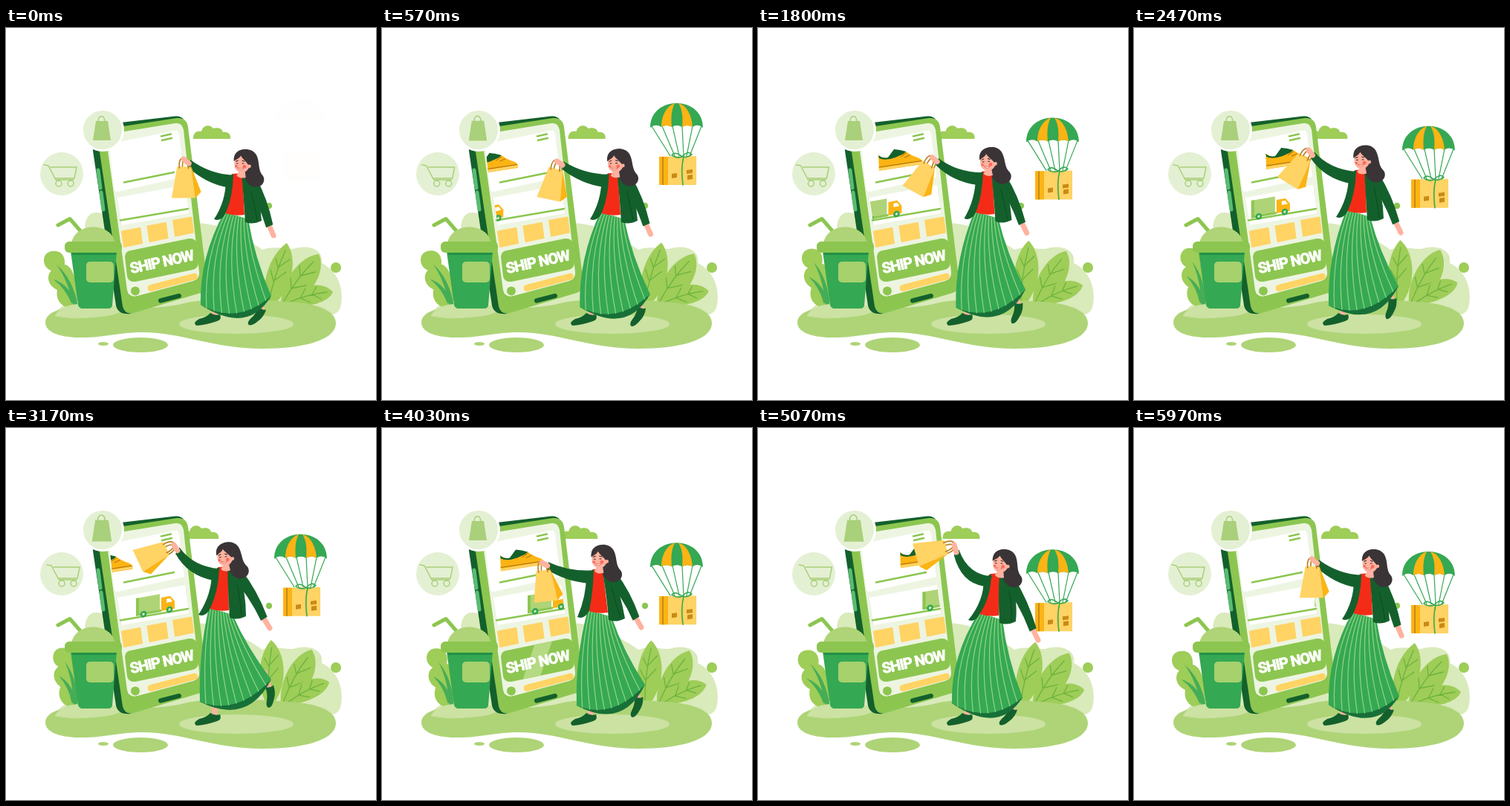
Recreate the animation shown at these times as an HTML page. Size 498 by 500 pixels, loop 6010 ms.

```html
<!DOCTYPE html>
<html lang="en">
<head>
<meta charset="utf-8">
<title>Ship now</title>
<style>
  html, body { margin: 0; width: 100%; height: 100%; overflow: hidden; background: #fff; }
  svg { display: block; width: 498px; height: 500px; }
  .lime { fill: #8cc650; } .sage { fill: #aed477; } .leaf { fill: #9ecd58; } .pale { fill: #d9eabb; }
  .dark { fill: #14602c; } .green { fill: #35a853; } .gold { fill: #ffd364; } .amber { fill: #fbb414; }
  .skin { fill: #ffb29f; } .hair { fill: #3a3437; } .white { fill: #fff; } .glow { fill: #cbe2a2; }
  .line { fill: none; stroke-linecap: round; stroke-linejoin: round; }
  .vein { stroke: #6cb33f; stroke-width: 1.3; }
  .icon { stroke: #a9d07a; stroke-width: 1.5; }
  .limb { fill: none; stroke: #ffb29f; stroke-width: 7; stroke-linecap: round; }
  text { font: 700 20px Roboto, "Open Sans", sans-serif; fill: #fff; stroke: #fff; stroke-width: .8; stroke-linejoin: round; }
</style>
</head>
<body>
<svg viewBox="0 0 498 500">
  <defs>
    <clipPath id="panelA"><path d="M139 156L226 138Q232 137 233 143L240 200L150 220Q146 221 145 215Z"/></clipPath>
    <clipPath id="panelB"><path d="M150 228L241 211L246 249L156 265Z"/></clipPath>
    <clipPath id="button"><path d="M168 299L246 283Q256 282 257 291L259 315Q259 323 251 325L174 341Q165 342 163 334L160 308Q160 300 168 299Z"/></clipPath>
  </defs>

  <path class="pale" d="M66 388C70 372 90 364 100 372L108 290C103 262 108 248 122 248C135 248 139 262 150 270L250 264C275 256 320 280 345 298C362 292 376 298 386 297C408 290 428 298 425 316C446 326 455 350 451 372C448 390 430 386 400 392L100 395Z"/>
  <circle class="leaf" cx="444" cy="322" r="7"/>
  <circle class="lime" cx="354" cy="239" r="4.2"/>

  <!-- plants -->
  <g id="leafA">
    <path class="leaf" d="M350 372C342 338 358 302 378 289C393 310 386 350 360 372Z"/>
    <path class="line vein" d="M354 368Q360 335 376 299M360 340L356 325M360 340L377 328M366 322L363 310M366 322L382 311"/>
  </g>
  <g id="leafB">
    <path class="leaf" d="M370 372C370 340 396 306 421 304C432 328 410 360 384 372Z"/>
    <path class="line vein" d="M373 369Q392 335 414 314M384 350L383 336M384 350L404 346M396 333L395 320M396 333L416 328"/>
  </g>
  <g id="leafC">
    <path class="leaf" d="M374 372C385 346 425 337 440 355C432 372 400 376 374 372Z"/>
    <path class="line vein" d="M380 369Q405 358 432 355M396 363L403 350M396 363L410 369M412 358L418 348M412 358L424 364"/>
  </g>
  <g id="bush">
    <path class="leaf" d="M96 376C78 379 66 368 69 352C56 346 54 333 61 326C48 322 47 302 62 300C75 298 80 308 79 318C90 320 97 340 96 376Z"/>
    <path fill="#45ad57" d="M91 374Q84 340 68 318Q90 337 97 374ZM88 370Q80 350 64 338Q84 344 95 370Z"/>
  </g>

  <path class="sage" d="M53 396C53 380 80 373 115 374C160 375 200 380 240 370C275 362 330 364 380 368C420 370 445 380 444 398C442 420 400 431 345 431C280 431 235 409 185 409C150 409 130 417 95 416C70 415 53 408 53 396Z"/>
  <path class="glow" d="M66 387C72 374 90 370 110 371L160 374Q158 386 120 389Q85 392 66 387Z"/>
  <ellipse class="glow" cx="310" cy="398" rx="77" ry="13"/>
  <ellipse class="sage" cx="181" cy="426" rx="37" ry="10"/>
  <ellipse class="sage" cx="131" cy="424.500" rx="7" ry="2.500"/>

  <path id="cloud" class="leaf" d="M0 149C0 140 5 138 11 139C13 130 23 129 27 135C33 133 39 135 40 140C47 139 51 143 50 149Z"/>

  <!-- phone -->
  <path class="dark" d="M117 165Q115 133 138 129L228 118.500Q236 118 239 123L236 135L150 145L168 384Q151 386 148 373Z"/>
  <path class="line" stroke="#58bd70" stroke-width="5" stroke-linecap="butt" d="M124 191L127 215M128 221L131 244"/>
  <path class="lime" d="M125 160Q122 139 139 135L230 121Q243 120 245 133L271 342Q272 353 262 356L172 383Q160 386 157 374Z"/>
  <path fill="#edf5e2" d="M137 165L138 150Q150 141 160 139L228 128Q237 127 239 137L260 328Q261 337 252 340L177 360Q165 363 163 352Z"/>
  <path class="white" d="M139 156L226 138Q232 137 233 143L240 200L150 220Q146 221 145 215ZM150 228L241 211L246 249L156 265Z"/>
  <path class="line" stroke="#8cc650" stroke-width="2.500" d="M159 207.500L226 194M154 258.500L245 243M209 145.500L222 142.500M210 151L223 148"/>
  <g clip-path="url(#panelA)"><g id="shoe">
    <path class="amber" d="M0 0L-1 -21Q5 -16 12 -18L20 -28L36 -26Q44 -20 54 -17Q60 -14 58 -9Z"/>
    <path class="dark" d="M-1 -21Q5 -16 12 -18L20 -29L28 -28L36 -26L33 -23L22 -18Q8 -13 0 -17Z"/>
    <path class="line" stroke="#ffd364" stroke-width="3" d="M1 -2L57 -11"/>
    <path class="line" stroke="#a96e12" stroke-width="1" d="M0 -5L57 -13.500M29 -19L36 -24M34 -18L41 -21"/>
  </g></g>
  <g clip-path="url(#panelB)"><g id="truck">
    <path class="sage" d="M0 0H32V23H0Z"/>
    <path class="lime" d="M0 0H4V23H0ZM0 21H34V24H0Z"/>
    <path class="amber" d="M34 5H46L52 13V23H34Z"/>
    <path class="white" d="M41 8H46L49 13H41Z"/>
    <g class="green"><circle cx="10" cy="23" r="4.300"/><circle cx="45" cy="23" r="4.300"/></g>
    <g class="pale"><circle cx="10" cy="23" r="1.700"/><circle cx="45" cy="23" r="1.700"/></g>
  </g></g>
  <path id="tile" class="gold" stroke="#ffd364" stroke-width="2" stroke-linejoin="round" d="M156 273.500L180.500 269L183 289L159 294Z"/>
  <use href="#tile" x="34.500" y="-7"/><use href="#tile" x="69" y="-14.500"/>
  <g clip-path="url(#button)">
    <path class="lime" d="M150 270H270V350H150Z"/>
    <path id="shine" fill="#b5da83" d="M4 280H26L4 345H-18Z"/>
  </g>
  <text transform="translate(168.500 330) rotate(-12)" letter-spacing="-1.100">SHIP NOW</text>
  <circle class="lime" cx="174" cy="353.500" r="6"/>
  <path class="line" stroke="#ffd364" stroke-width="9" d="M195 349.500L253.500 334"/>
  <path class="line" stroke="#14602c" stroke-width="6" d="M208 366.500L233 360"/>

  <!-- floating icons -->
  <circle cx="130" cy="137" r="27.500" fill="#e4f0d3" stroke="#fff" stroke-width="3"/>
  <g id="bagIcon">
    <path fill="#a9d07a" d="M-8 -11H8L12 15H-12Z"/><path class="line icon" d="M-5 -9C-6 -20 5 -20 4 -9"/>
  </g>
  <circle cx="75" cy="196" r="29" fill="#e4f0d3"/>
  <path id="cart" class="line icon" d="M51 184L57 185L67 204H91M60 187H95L92 202H66M67 209a4 4 0 1 0 8 0a4 4 0 1 0 -8 0M83 209a4 4 0 1 0 8 0a4 4 0 1 0 -8 0"/>

  <!-- cup -->
  <path class="line" stroke="#8cc650" stroke-width="5" stroke-linecap="butt" d="M70 265L86 256.500L103 276"/>
  <path class="sage" d="M88 290C92 260 143 260 147 290Z"/>
  <path class="green" d="M87 300H149L143 373Q142 377 138 377H103Q98 377 97 372Z"/>
  <path fill="#238f47" d="M88 301H149L148.500 305H88.500Z"/>
  <rect class="lime" x="79" y="287" width="77" height="15" rx="6"/>
  <rect x="108" y="314" width="37" height="28" rx="5" fill="#a6d16d"/>

  <!-- parachute, canopy top at 0 -->
  <g id="chute">
    <path class="line" stroke="#35a853" stroke-width="1.200" d="M363 31L388 71M377 31L394 71M391 31L400 71M404 31L406 71M418 31L410 71M430 31L414 71"/>
    <path class="green" d="M361 33C361 -11 432 -11 432 33Q425 27 418 32Q411 28 404 32Q397 28 390 32Q383 28 376 32Q368 27 361 33Z"/>
    <path class="amber" d="M376 32C376 19 381 5 394 0C389 10 389 21 390 32Q383 28 376 32ZM404 32C405 21 405 10 399 0C412 4 417 19 418 32Q411 28 404 32Z"/>
    <path class="gold" d="M373 72L423 71V110H373Z"/>
    <path class="amber" d="M373 72H385V110H373Z"/>
    <path fill="#c98a16" d="M377 72H379V110H377ZM390 95L397 94V100L390 101ZM410 90L418 89V94L410 95ZM411 97L418 96V102L411 103Z"/>
    <path class="line" stroke="#35a853" stroke-width="1.600" d="M406 72Q402 88 405 110M404 72Q394 64 390 70Q396 75 404 72Q412 63 417 69Q411 74 404 72"/>
  </g>

  <!-- woman -->
  <path id="legs" class="limb"/>
  <path class="dark" d="M275 383Q281 387 288 385Q291 392 284 394Q270 399 257 400Q250 397 260 391Q270 389 275 383Z"/>
  <path id="foot" class="dark" d="M-5 0Q1 2 6 -2Q9 8 6 16Q3 28 -2 28Q-6 26 -4 18Q-2 10 -5 0Z"/>
  <path id="lining" fill="#177038"/>
  <path id="skirt" class="green"/>
  <path id="pleats" class="line" stroke="#93d483" stroke-width="1.200"/>
  <path id="shirt" fill="#f42c17"/>
  <path id="jacket" class="dark"/>
  <path id="seam" class="line" stroke="#0b4a20" stroke-width="1"/>
  <path id="handB" class="limb"/>
  <path id="armB" class="dark"/>
  <path id="armA" class="dark"/>
  <g id="bag">
    <path class="gold" d="M-9 11L10 12L14 54L-18 53Z"/>
    <path class="amber" d="M10 12L22 46L14 54Z"/>
    <path class="line" stroke="#b9801f" stroke-width="1.600" d="M-6 13C-8 -5 6 -5 6 14M-2 11C-2 -4 9 -2 9 12"/>
  </g>
  <path id="handA" class="limb"/>
  <g id="head">
    <path class="hair" d="M-11 -8C-12 -20 12 -26 20 -12C25 -2 22 8 28 16C34 22 30 32 22 33C14 35 7 30 3 20L-2 -8Z"/>
    <path class="skin" d="M-11 -4C-10 -14 10 -14 11 -2C12 4 8 10 4 12L5 20Q-4 22 -8 17L-5 12C-10 10 -12 4 -11 -4Z"/>
    <path class="hair" d="M-12 -3C-13 -16 -2 -22 8 -19C16 -17 21 -8 20 6C16 12 12 10 10 5C8 -1 1 -5 -2 -11C-4 -7 -8 -6 -12 -3Z"/>
    <circle class="skin" cx="10" cy="4" r="2.500"/>
    <g fill="#f9695b"><circle cx="3" cy="4.500" r="2.500"/><circle cx="-8.500" cy="4" r="1.800"/></g>
    <path class="white" stroke="#d83b30" stroke-width=".6" d="M-7 6Q-3 8 2 7Q-2 12 -7 6Z"/>
    <path class="line" stroke="#3a3437" stroke-width="1.200" d="M-8 0L-6 0M0 0L2 0M-9 -3L-6 -4M0 -4L3 -3"/>
  </g>
</svg>
<script>
const PERIOD = 6010;
const KEYS = [0, 1130, 2470, 3170, 4030, 5070];

// One row per key time: x, y and, where needed, an angle
const pose = {
  head: [[318, 182, 0], [312, 181, -5], [307, 177, -4], [295, 173, -7], [293, 176, -2], [327, 182, 2]],
  neck: [[310, 198], [309, 196], [303, 193], [291, 189], [289, 192], [318, 198]],
  waist: [[306, 250], [306, 250], [298, 247], [285, 244], [289, 247], [309, 251]],
  elbow: [[272, 203], [268, 203], [260, 196], [248, 192], [250, 200], [278, 203]],
  hold: [[239, 176], [234, 180], [235, 164], [226, 157], [215, 181], [264, 157]],
  free: [[360, 279], [363, 276], [359, 275], [355, 269], [349, 268], [377, 285]],
  bag: [[-2], [24], [30], [63], [-8], [72]],
  hemL: [[262, 372], [270, 377], [262, 373], [261, 368], [262, 373], [261, 370]],
  hemR: [[357, 360], [364, 355], [356, 347], [357, 338], [354, 345], [356, 362]],
  foot: [[344, 377, 35], [353, 374, 14], [347, 364, 10], [354, 348, -3], [345, 362, 14], [343, 377, 35]]
};
// The shoe crosses its panel twice: quick in, slow drift, quick out
const shoePath = [[0, 75], [270, 112], [1130, 148], [2470, 178], [2800, 250], [2801, 75],
  [3170, 112], [4030, 160], [5070, 192], [5500, 250], [PERIOD, 250]];

const $ = id => document.getElementById(id);
const draw = (id, d) => $(id).setAttribute('d', d);
const place = (id, value) => $(id).setAttribute('transform', value);
const lerp = (a, b, u) => a.map((v, i) => v + (b[i] - v) * u);
const off = (p, x, y) => [p[0] + x, p[1] + y];
const quad = (a, c, b) => `M${a}Q${c} ${b}`;

// Curved sleeve, from half width wa at a to wb at b
function sleeve(a, c, b, wa, wb) {
  const dx = b[0] - a[0], dy = b[1] - a[1], len = Math.hypot(dx, dy);
  const side = (p, w) => off(p, -dy / len * w, dx / len * w);
  const wc = (wa + wb) / 2;
  return `${quad(side(a, wa), side(c, wc), side(b, wb))}L${side(b, -wb)}Q${side(c, -wc)} ${side(a, -wa)}Z`;
}

// Smooth periodic curve through the rows that rests at turning points
function sample(rows, t) {
  const n = KEYS.length;
  const time = j => KEYS[(j + n) % n] + PERIOD * Math.floor(j / n);
  const row = j => rows[(j + n) % n];
  const i = KEYS.findLastIndex(k => k <= t);
  const span = time(i + 1) - time(i), u = (t - time(i)) / span;
  return row(i).map((a, k) => {
    const b = row(i + 1)[k];
    const rate = j => (row(j + 1)[k] - row(j)[k]) / (time(j + 1) - time(j));
    const slope = j => {
      const p = rate(j - 1), q = rate(j);
      return p * q > 0 ? 2 * p * q / (p + q) * span : 0;
    };
    const m = slope(i), q = slope(i + 1);
    return a + u * (m + u * (3 * (b - a) - 2 * m - q + u * (2 * (a - b) + m + q)));
  });
}

function linear(points, t) {
  const i = Math.max(1, points.findIndex(p => p[0] > t));
  const [a, x] = points[i - 1], [b, y] = points[i];
  return x + (y - x) * (t - a) / (b - a);
}

function scenery(t) {
  const angle = 2 * Math.PI * t / PERIOD;
  const wave = Math.cos(angle), sway = (1 - wave) / 2;
  place('cloud', `translate(${244 + 8 * wave})`);
  place('leafA', `rotate(${-15 * sway} 352 368)`);
  place('leafB', `rotate(${-8 * sway} 372 370)`);
  place('leafC', `rotate(${-13 * sway} 378 370)`);
  place('bush', `rotate(${11.5 * sway} 92 372)`);

  // icons beat three times per loop
  const beat = -Math.cos(3 * angle);
  place('cart', `translate(${2.2 + 2.2 * beat})`);
  place('bagIcon', `translate(129 136) scale(${1 + .12 * Math.max(0, beat)})`);

  const x = linear(shoePath, t);
  place('shoe', `translate(${x} ${194 - .13 * (x - 148)})`);
  const tx = 97.3 + .0245 * t;
  place('truck', `translate(${tx} ${232 - .18 * (tx - 158)}) skewY(-10)`);
  place('shine', `translate(${205 + (t - 4030) * .18})`);

  const fall = Math.sin(angle / 4) ** 1.3;
  place('chute', `translate(0 ${95 + 71 * fall})`);
  $('chute').style.opacity = Math.min(1, t / 300);
}

function woman(t) {
  const p = {};
  for (const key in pose) p[key] = sample(pose[key], t);
  const { neck: n, waist: w, hold, free, hemL, hemR, foot } = p;

  const ankle = foot.slice(0, 2);
  draw('legs', `M281 370L281 386M${off(ankle, -6, -20)}L${ankle}`);
  place('foot', `translate(${ankle}) rotate(${foot[2]})`);

  const top = [off(w, -12, -3), off(w, 20, 7)];
  const side = [[hemL[0] - 2, (top[0][1] + hemL[1]) / 2], off(lerp(top[1], hemR, .5), -7, 0)];
  const dip = off(lerp(hemL, hemR, .5), 2, 34);
  draw('skirt', `M${top[0]}L${top[1]}Q${side[1]} ${hemR}Q${dip} ${hemL}Q${side[0]} ${top[0]}Z`);
  draw('lining', `M${hemL}L${hemR}Q${off(dip, 14, 13)} ${hemL}Z`);
  let pleats = '';
  for (let u = .08; u < 1; u += .105) {
    const hem = lerp(lerp(hemL, dip, u), lerp(dip, hemR, u), u);
    pleats += quad(lerp(...top, u), lerp(...side, u), hem);
  }
  draw('pleats', pleats);

  draw('shirt', `M${off(n, -5, -2)}L${off(n, 8, -3)}L${off(w, 15, 1)}Q${off(w, 2, 3)} ${off(w, -11, -1)}Z`);
  draw('jacket',
    `M${off(n, -5, -2)}L${off(n, -14, 5)}Q${off(n, -14, 35)} ${off(w, -26, 7)}` +
    `Q${off(w, -16, 11)} ${off(w, -10, -2)}Q${off(n, -5, 30)} ${off(n, -4, 0)}Z` +
    `M${off(n, 7, -3)}L${off(n, 22, 6)}Q${off(n, 32, 30)} ${off(w, 38, 9)}` +
    `Q${off(w, 26, 15)} ${off(w, 16, 11)}Q${off(w, 14, -20)} ${off(n, 7, -3)}Z`);
  draw('seam', quad(off(n, 20, 22), off(n, 24, 38), off(w, 32, 8)));

  const shoulder = off(n, 19, 6), wristB = lerp(shoulder, free, .83);
  draw('armB', sleeve(shoulder, off(lerp(shoulder, wristB, .5), 4, -4), wristB, 8, 5));
  draw('handB', `M${wristB}L${free}`);

  const wristA = lerp(p.elbow, hold, .78);
  draw('armA', sleeve(off(n, -8, 8), p.elbow, wristA, 9, 5));
  draw('handA', `M${wristA}L${hold}`);
  place('bag', `translate(${off(hold, 0, -1)}) rotate(${p.bag})`);
  place('head', `translate(${p.head.slice(0, 2)}) rotate(${p.head[2]}) scale(.95)`);
}

const start = performance.now();
function frame() {
  const t = (performance.now() - start) % PERIOD;
  scenery(t);
  woman(t);
  requestAnimationFrame(frame);
}
frame();
</script>
</body>
</html>
```
